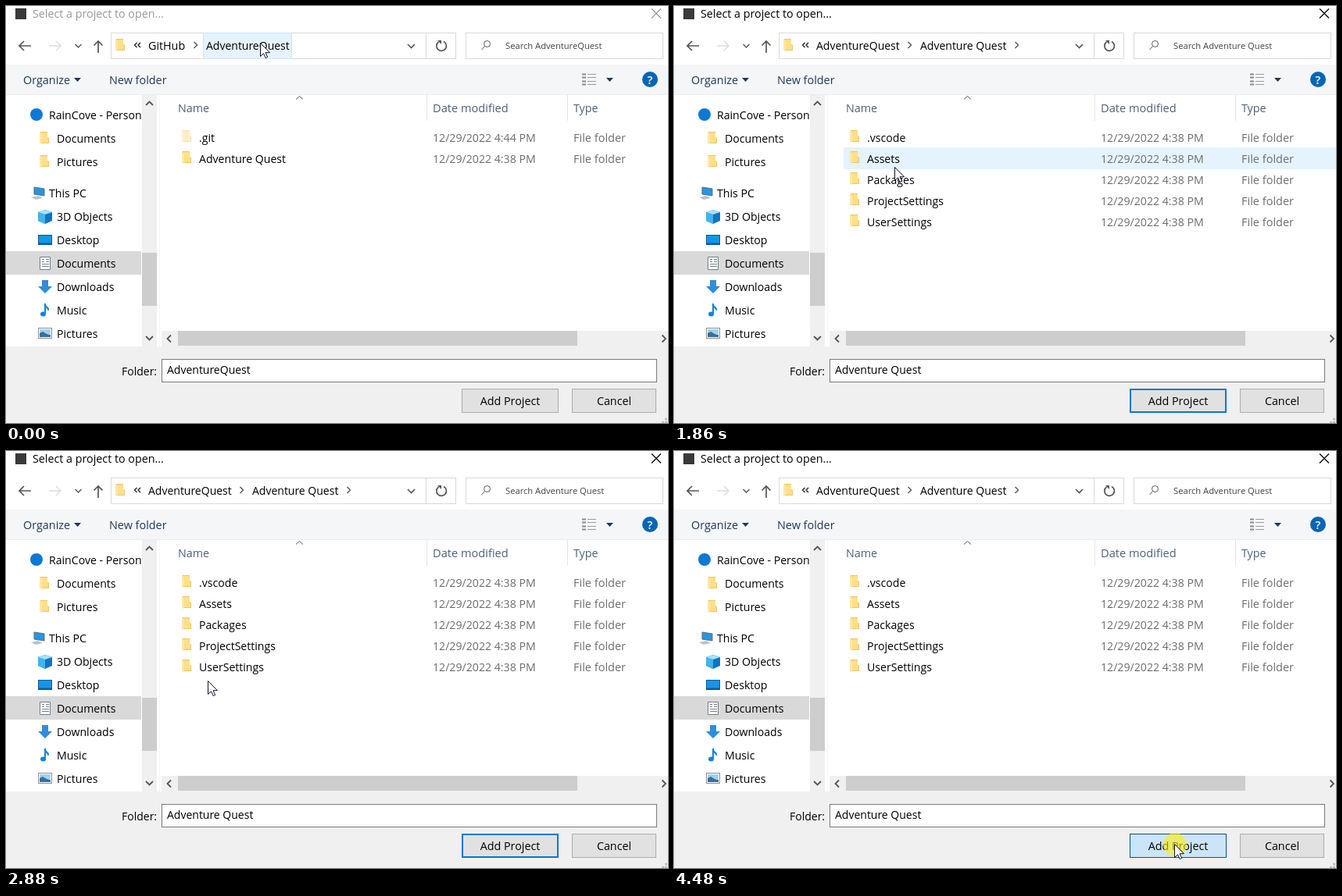
Recreate the animation shown at these times as an HTML page. Size 847x534 px, loop 4.51 s.

```html
<!DOCTYPE html>
<html lang="en">
<head>
<meta charset="utf-8">
<title>Select a project</title>
<style>
html, body { margin: 0; width: 100%; height: 100%; overflow: hidden; background: #fff; }
svg { display: block; width: 847px; height: 534px; }
text { font-family: "Open Sans", "Noto Sans", sans-serif; font-size: 14px; fill: #000; white-space: pre; }
.label { font-size: 14.3px; }
.item { font-size: 14.1px; }
.head { font-size: 14.3px; fill: #4c607a; }
.bar { font-size: 14.4px; fill: #1e395b; }
.dim { font-size: 14.15px; fill: #6d6d6d; }
.small { font-size: 11.2px; fill: #444; }
.line { fill: none; stroke: #555; stroke-width: 1.4; }
.box { fill: #fff; stroke: #d9d9d9; }
</style>
</head>
<body>
<svg viewBox="0 0 847 534">
  <defs>
    <symbol id="folder" width="14" height="19" viewBox="0 0 14 19">
      <path d="M2 1h9v7l2 1v7H2z" fill="#f0c661"/>
      <path d="M4 2h7v7l1 1v5H4z" fill="#ffdf8a"/>
      <path d="M1 1l3 2v14l-3-1z" fill="#ffe7a6"/>
    </symbol>
    <clipPath id="pane"><rect y="114" width="173" height="322"/></clipPath>
  </defs>
  <rect width="847" height="534" fill="#fff"/>

  <!-- title bar -->
  <rect x="12" y="3" width="14" height="14" fill="#3a3a3a"/>
  <text id="title" class="label" x="34" y="15">Select a project to open...</text>
  <path id="close" d="M826 3.500l12 12M838 3.500l-12 12" fill="none" stroke="#000" stroke-width="1.2"/>

  <!-- navigation -->
  <path class="line" d="M32 51H17M23 45l-6 6 6 6" style="stroke-width:1.7"/>
  <path class="line" d="M55 51h15M64 45l6 6-6 6" style="stroke:#dcdcdc"/>
  <path class="line" d="M88.500 49l4 4 4-4"/>
  <path class="line" d="M118 60V45M112.500 50.500l5.500-5.500 5.500 5.500" style="stroke-width:1.7"/>
  <rect class="box" x="134.500" y="34.500" width="441" height="33"/>
  <path d="M537.500 35v32" stroke="#d9d9d9"/>
  <use href="#folder" x="139" y="41"/>
  <path class="line" d="M167.500 47l-3 3 3 3M172 47l-3 3 3 3" style="stroke:#222"/>
  <rect id="crumbHover" x="252.500" y="34.500" width="113" height="33" fill="#e5f3ff" stroke="#cce8ff"/>
  <g id="crumbsOld">
    <text x="182" y="56" class="label">GitHub</text>
    <path class="line" d="M240.500 46l4 4-4 4"/>
    <text x="256" y="56">AdventureQuest</text>
  </g>
  <g id="crumbsNew">
    <text x="182" y="56">AdventureQuest</text>
    <path class="line" d="M299.500 46l4 4-4 4"/>
    <text x="315" y="56">Adventure Quest</text>
    <path id="tail" class="line" d="M436.500 46l4 4-4 4"/>
  </g>
  <path class="line" d="M514 49l4.500 4.500 4.500-4.500" style="stroke-width:1.6"/>
  <path class="line" d="M553.500 46a6.300 6.300 0 1 0 6.500-.5" style="stroke-width:1.7"/>
  <path d="M552 44h5v5z" fill="#555"/>
  <rect class="box" x="588.500" y="34.500" width="252" height="33"/>
  <g class="line" style="stroke-width:1"><circle cx="615.500" cy="48.500" r="4"/><path d="M612.500 51.500l-4 4.500"/></g>
  <text id="search" class="small" x="639" y="55"></text>

  <!-- command bar -->
  <rect y="75" width="847" height="39" fill="#f5f6f7"/>
  <path d="M0 113.500h847" stroke="#ebecee"/>
  <text class="bar" x="22" y="100">Organize</text>
  <path d="M87 92h9l-4.500 5z" fill="#1e395b"/>
  <text class="bar" x="132" y="100">New folder</text>
  <path d="M737 87.500h5M737 91.500h5M737 96.500h5M737 100.500h5" stroke="#8a8a8a" stroke-width="2"/>
  <path d="M744 87.500h11M744 91.500h11M744 96.500h11M744 100.500h11" stroke="#9a9a9a"/>
  <path d="M768 92h9l-4.500 5z" fill="#1e395b"/>
  <circle cx="824" cy="94" r="10" fill="#0565b5"/>
  <text x="824" y="99.500" text-anchor="middle" style="fill:#fff;font-weight:600;font-size:15px">?</text>

  <!-- side pane -->
  <g clip-path="url(#pane)">
    <rect y="314" width="173" height="30" fill="#d9d9d9"/>
    <circle cx="39" cy="139" r="8" fill="#0f78d4"/>
    <use href="#folder" x="42" y="160"/>
    <use href="#folder" x="42" y="190"/>
    <path d="M36 232l13 2v9l-13-2z" fill="#2497e3" stroke="#5c6c78"/>
    <path d="M32 245l9-2 6 3-9 2z" fill="#b9c3ca"/>
    <path d="M41 264l9-3 9 3v11l-9 4-9-4z" fill="#1173c4"/>
    <path d="M41 264l9 3v12l-9-4z" fill="#3fb4ee"/>
    <path d="M41 264l9-3 9 3-9 3z" fill="#a5e2fb"/>
    <rect x="41.500" y="293.500" width="17" height="12" fill="#1795e6" stroke="#0b5a9c"/>
    <path d="M42 304.500h16" stroke="#0b5a9c" stroke-width="2"/>
    <g stroke="#6f7f8c">
      <path d="M43.500 321.500h13v16h-13z" fill="#fff"/>
      <path d="M46 324.500h3M51 324.500h4M46 327.500h3M51 327.500h4M46 330.500h9M46 333.500h9"/>
    </g>
    <path d="M46 351h8v8h5l-9 9-9-9h5z" fill="#2f8ddb"/>
    <path d="M50 381v13" stroke="#1284d8" stroke-width="2"/>
    <path d="M50 380q1 4 4 6 2 2 0 5-1-4-4-5z" fill="#1284d8"/>
    <ellipse cx="47.500" cy="394.500" rx="3.500" ry="3" fill="#1284d8"/>
    <rect x="41.500" y="412.500" width="17" height="13" fill="#fff" stroke="#8d8d8d"/>
    <path d="M43 414h14v6H43z" fill="#9bd3f5"/>
    <path d="M43 424v-5l4-2 5 3 5 1v3z" fill="#3c6f96"/>
    <g id="places"></g>
  </g>
  <rect x="174" y="114" width="19" height="322" fill="#f0f0f0"/>
  <rect x="174" y="316" width="19" height="68" fill="#cdcdcd"/>
  <path class="line" d="M179 127l4.500-4.500 4.500 4.500M179 423l4.500 4.500 4.500-4.500" style="stroke-width:1.8"/>
  <path d="M196.500 114v322" stroke="#f5f5f5"/>

  <!-- file list -->
  <rect id="headHover" x="199" y="114" width="339" height="33" fill="#d9ebf9"/>
  <path class="line" d="M371 119.500l4.500-4 4.500 4" style="stroke-width:1"/>
  <path d="M538.500 114v33M718.500 114v33" stroke="#e5e5e5"/>
  <text class="head" x="220" y="136">Name</text>
  <text class="head" x="546" y="136" style="font-size:14.6px">Date modified</text>
  <text class="head" x="726" y="136">Type</text>
  <rect id="rowHover" x="217" width="630" height="28"/>
  <g id="listOld"></g>
  <g id="listNew"></g>
  <rect x="199" y="416" width="648" height="20" fill="#f0f0f0"/>
  <rect x="220" y="416" width="511" height="19" fill="#cdcdcd"/>
  <path class="line" d="M211 421.500l-4.500 4.500 4.500 4.500M839.500 421.500l4.500 4.500-4.500 4.500" style="stroke-width:1.8"/>

  <!-- footer -->
  <rect y="436" width="847" height="98" fill="#f0f0f0"/>
  <text x="148" y="473">Folder:</text>
  <rect id="field" x="199.500" y="452.500" width="633" height="29" fill="#fff"/>
  <text id="folderName" x="206" y="471"></text>
  <rect id="add"/>
  <text class="label" x="645" y="511" text-anchor="middle">Add Project</text>
  <rect x="724.500" y="490.500" width="107" height="30" fill="#e1e1e1" stroke="#adadad"/>
  <text class="label" x="778" y="511" text-anchor="middle">Cancel</text>
  <path d="M843 529h3M839 533h3M843 533h3" stroke="#bcbcbc" stroke-width="2.500"/>

  <g id="cursor">
    <circle id="click" r="15" fill="#ffee00" fill-opacity=".6"/>
    <path d="M-.5-.5v17l4-3.700 2.700 5.700 2.500-1.100-2.700-5.700h5.500z" fill="#fff" stroke="#10102a"/>
  </g>
</svg>
<script>
const LOOP = 4510;
const $ = id => document.getElementById(id);
const set = (id, attrs) => { for (const k in attrs) $(id).setAttribute(k, attrs[k]); };
const show = (id, on) => { $(id).style.display = on ? "" : "none"; };

// time, x, y of the pointer tip
const path = [
  [0, 326, 48], [260, 326, 48], [380, 317, 82], [580, 298, 148], [760, 285, 188], [850, 279, 198],
  [1760, 279, 198], [1860, 283, 207], [1950, 287, 216], [2070, 284, 197], [2250, 262, 138],
  [2310, 252, 147], [2490, 225, 188], [2640, 230, 238], [2800, 246, 300], [2850, 249, 306],
  [2950, 280, 270], [3080, 330, 205], [3190, 358, 166], [3310, 326, 149],
  [3610, 326, 149], [3720, 466, 277], [3880, 548, 380], [4010, 600, 452], [4110, 628, 489],
  [4200, 638, 499], [4300, 641, 504], [LOOP, 641, 504]
];

function pointer(t) {
  const i = path.findIndex(p => p[0] > t);
  const [t0, x0, y0] = path[i - 1], [t1, x1, y1] = path[i];
  const k = (t - t0) / (t1 - t0);
  return [Math.round(x0 + (x1 - x0) * k), Math.round(y0 + (y1 - y0) * k)];
}

const row = (name, i, time = "4:38", fade = 1) => {
  const y = 174 + 27 * i;
  return `<use href="#folder" x="224" y="${y - 16}" opacity="${fade}"/>
    <text class="item" x="247" y="${y}">${name}</text>
    <text class="dim" x="546" y="${y}">12/29/2022 ${time} PM</text>
    <text class="dim" x="726" y="${y}" style="font-size:14.5px">File folder</text>`;
};
$("listOld").innerHTML = row(".git", 0, "4:44", .5) + row("Adventure Quest", 1);
$("listNew").innerHTML = [".vscode", "Assets", "Packages", "ProjectSettings", "UserSettings"]
  .map((name, i) => row(name, i)).join("");

const places = [[55, 145, "RainCove - Personal"], [65, 175, "Documents"], [65, 205, "Pictures"], [55, 245, "This PC"]];
["3D Objects", "Desktop", "Documents", "Downloads", "Music", "Pictures"]
  .forEach((name, i) => places.push([65, 275 + 30 * i, name]));
$("places").innerHTML = places.map(([x, y, s]) => `<text class="item" x="${x}" y="${y}">${s}</text>`).join("");

function addButton(active, hover, pressed) {
  const thick = active && !pressed;
  const inset = thick ? 1 : .5;
  set("add", {
    x: 583 + inset, y: 490 + inset, width: 124 - 2 * inset, height: 31 - 2 * inset,
    fill: pressed ? "#cce4f7" : hover ? "#e5f1fb" : "#e1e1e1",
    stroke: pressed ? "#005499" : active ? "#0078d7" : "#adadad",
    "stroke-width": thick ? 2 : 1
  });
}

function draw(now) {
  const t = now % LOOP;
  const [x, y] = pointer(t);
  const chosen = t >= 1110, active = t >= 1260, opened = t >= 1460;
  const selected = chosen && !opened;
  const pressed = t >= 4400;

  set("cursor", { transform: `translate(${x} ${y})` });
  show("click", (chosen && t < 1530) || pressed);

  $("title").style.fill = active ? "#000" : "#999";
  set("close", { stroke: active ? "#000" : "#999" });
  show("crumbsOld", !opened);
  show("crumbsNew", opened);
  show("tail", t >= 1760);
  show("listOld", !opened);
  show("listNew", opened);
  $("search").textContent = opened ? "Search Adventure Quest" : "Search AdventureQuest";
  $("folderName").textContent = chosen ? "Adventure Quest" : "AdventureQuest";

  show("crumbHover", y >= 34 && y < 68);
  show("headHover", y >= 114 && y < 147);
  const i = Math.floor((y - 154) / 27);
  show("rowHover", i >= 0 && i < (opened ? 5 : 2));
  set("rowHover", { y: 154 + 27 * i, fill: selected ? "#cce8ff" : "#e5f3ff" });
  set("field", { stroke: y >= 452 && t < 4140 ? "#171717" : "#7a7a7a" });
  addButton(active, y >= 490, pressed);
}

function tick() {
  draw(performance.now());
  requestAnimationFrame(tick);
}
tick();
</script>
</body>
</html>
```
